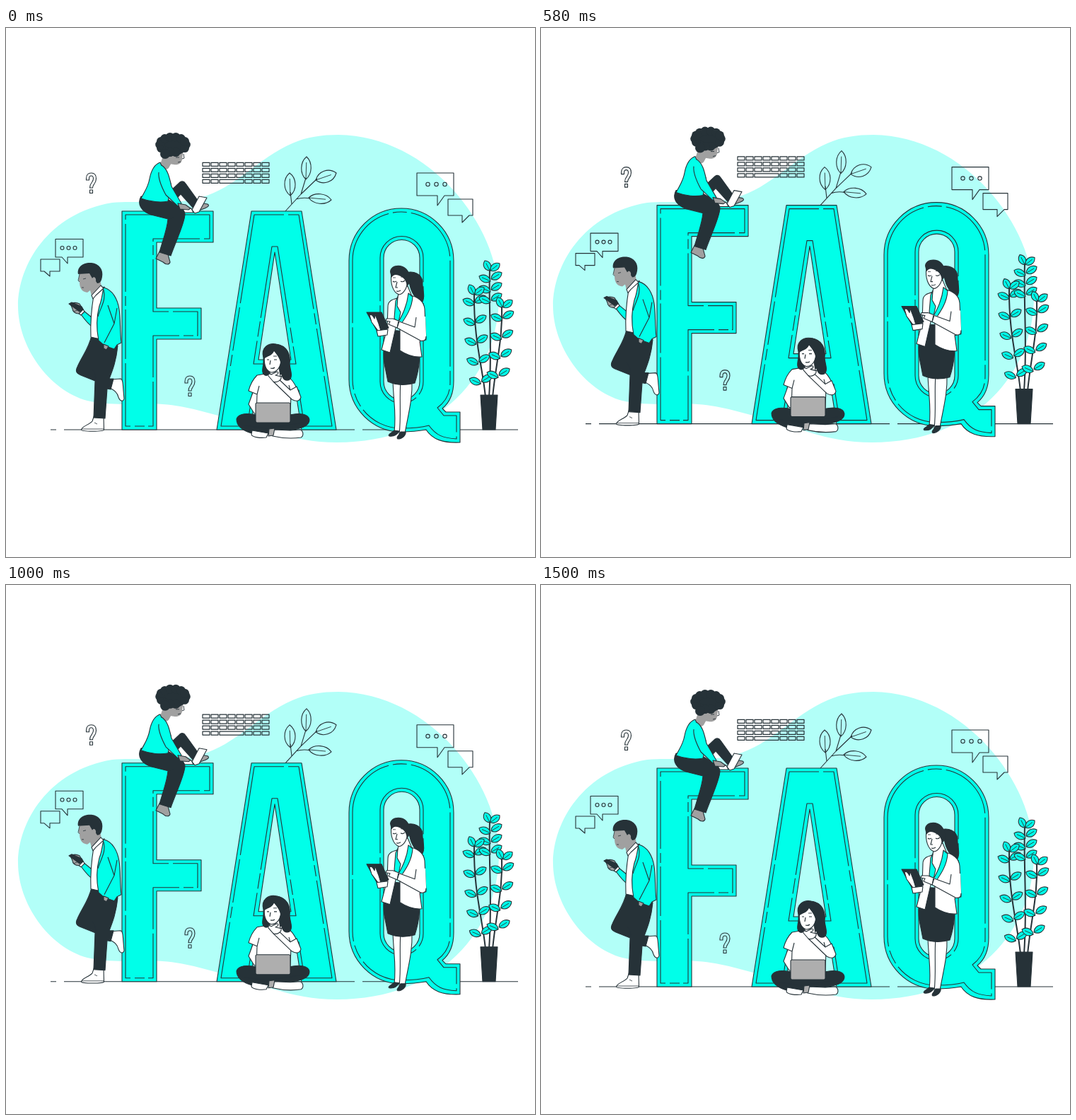
Write an HTML page with a canvas that moves like this. It is 748 by 748 pixels and loops after 1540 ms.

```html
<!DOCTYPE html>
<html lang="en">
<head>
<meta charset="utf-8">
<title>FAQ</title>
<style>
html, body { margin: 0; width: 100%; height: 100%; overflow: hidden; background: #fff; }
canvas { display: block; width: 748px; height: 748px; }
</style>
</head>
<body>
<canvas id="stage" width="748" height="748"></canvas>
<script>
const ctx = document.getElementById('stage').getContext('2d');
const INK = '#263238', CYAN = '#00ffe9', PALE = '#b2fff8', WHITE = '#fff', SKIN = '#a0a0a0', GREY = '#aeaeae';
const LOOP = 1540, STEP = 1500 / 36, LIFT = 10.8;

function shape(d, fill, width = 1.1) {
  const path = new Path2D(d);
  if (fill) { ctx.fillStyle = fill; ctx.fill(path, 'evenodd'); }
  if (width) { ctx.lineWidth = width; ctx.stroke(path); }
}
const line = (d, width) => shape(d, null, width);

function dashed(d, pattern, offset = 0) {
  ctx.setLineDash(pattern);
  ctx.lineDashOffset = offset;
  line(d, 1.1);
  ctx.setLineDash([]);
}

function dot(x, y, r, fill, width = 1.1) {
  ctx.beginPath();
  ctx.arc(x, y, r, 0, 7);
  if (fill) { ctx.fillStyle = fill; ctx.fill(); }
  if (width) { ctx.lineWidth = width; ctx.stroke(); }
}

// Pointed oval from base to tip, with a midrib.
function leaf(x, y, tx, ty, wide, fill) {
  const mx = (x + tx) / 2, my = (y + ty) / 2, len = Math.hypot(tx - x, ty - y);
  const nx = -(ty - y) / len * wide, ny = (tx - x) / len * wide;
  const ux = (tx - x) * .25, uy = (ty - y) * .25;
  shape(`M${x} ${y}C${mx + nx - ux} ${my + ny - uy} ${mx + nx + ux} ${my + ny + uy} ${tx} ${ty}` +
    `C${mx - nx + ux} ${my - ny + uy} ${mx - nx - ux} ${my - ny - uy} ${x} ${y}Z`, fill);
  line(`M${x} ${y}L${x + (tx - x) * .75} ${y + (ty - y) * .75}`, .9);
}

function blob() {
  shape('M17 393C17 335 60 262 150 247C190 243 230 252 275 240C325 226 355 185 405 163C425 154 447 151 470 151' +
    'C600 153 697 280 697 380C697 488 614 586 468 586C400 586 360 562 300 548C270 540 240 531 200 531' +
    'C170 532 140 533 115 527C60 512 17 450 17 393Z', PALE, 0);
}

function question(x, y) {
  ctx.save();
  ctx.translate(x, y);
  line('M0 8C0 2.500 3 0 7 0C11 0 14 2.500 14 8C14 12 12.500 14 11 16C9.500 18 9 18.500 9 21H5C5 17 6 15.500 8 13' +
    'C9.500 11 10 10 10 8C10 5.500 9 4 7 4C5 4 4 5.500 4 8V10H0ZM5 24H9V28.500H5Z');
  ctx.restore();
}

function keyboard() {
  ctx.lineWidth = 1.2;
  for (let row = 0; row < 4; row++) {
    for (let col = 0; col < 8; col++) {
      const space = row === 3 && col === 2;
      ctx.strokeRect(278 + col * 12, 190.3 + row * 8, space ? 34 : 10, 5);
      if (space) col += 2;
    }
  }
}

function bubbles() {
  line('M70 298.5H109V324H87V333L79 324H70Z');
  line('M49 327H76V344H62V351L54 344H49Z');
  line('M581 205H633V237H620L610 251V237H581Z');
  line('M625 242H660V265H655L645 275V265H625Z');
  for (const i of [0, 1, 2]) {
    dot(79.5 + i * 9, 311, 2.5);
    dot(596.5 + i * 12, 221, 2.7);
  }
}

function branch() {
  line('M395 259L417 235L440 213M404 249L402 232M417 235L424 212M410 242Q420 239 430 241');
  leaf(402, 237, 401, 205, 10);
  leaf(424, 214, 425, 182, 9);
  leaf(438, 215, 467, 205, 11);
  leaf(428, 240, 460, 243, 9);
}

function letterF() {
  shape('M164 259H293V303H213V396H276V440H213V568H164Z', CYAN);
  dashed('M169 264H288V298H208V401H271V435H208V563H169Z', [70, 5, 14, 6, 96, 6], 30);
}

function letterA() {
  shape('M347 259H418L467 568H418L410 517H353L345 568H298ZM380 317L357 469H403Z', CYAN);
  dashed('M351 264H414L461 563H422L414 512H349L341 563H304Z', [62, 6, 150, 6, 16, 6], 20);
  dashed('M376 309H384L410 475H350Z', [118, 6, 22, 5]);
}

function letterQ() {
  shape('M485 329A74 74 0 0 1 633 329V499C633 516 628 529 617 538L622 543H642V586C618 587 603 582 594 568' +
    'C583 570 572 571 559 571A74 74 0 0 1 485 497ZM534 325A25.500 25.500 0 0 1 585 325V500A25.500 25.500 0 0 1 534 500Z', CYAN);
  dashed('M490 329A69 69 0 0 1 628 329V500C628 518 622 528 610 537L619 548H637V581C618 580 608 576 598 562' +
    'C587 565 572 566 559 566A69 69 0 0 1 490 497Z', [150, 6, 20, 6, 88, 6], 60);
  dashed('M529 325A30.500 30.500 0 0 1 590 325V500A30.500 30.500 0 0 1 529 500Z', [130, 6, 18, 6]);
}

function plant() {
  line('M678 522C674 480 661 440 662 376M683 522C688 450 682 400 684 342M688 522C693 470 703 440 701 388', 2);
  const stems = [
    { x: y => 662 + ((y - 376) / 146) ** 2 * 13, from: 388, to: 505, gap: 28 },
    { x: () => 685, from: 355, to: 395, gap: 15 },
    { x: y => 702 - ((y - 388) / 134) ** 2 * 10, from: 410, to: 510, gap: 27 }
  ];
  for (const { x, from, to, gap } of stems) {
    for (let y = from; y < to; y += gap) {
      const cx = x(y);
      leaf(cx, y + 3, cx - 16, y - 4, 6.5, CYAN);
      leaf(cx + 1, y, cx + 16, y - 9, 6.5, CYAN);
    }
  }
  const tip = (x, y) => {
    leaf(x, y, x - 7, y - 14, 6.5, CYAN);
    leaf(x + 1, y, x + 14, y - 10, 6.5, CYAN);
  };
  tip(662, 377);
  tip(684, 343);
  tip(702, 395);
  shape('M671 519H695L692 568H674Z', INK);
}

function man() {
  // legs and shoes
  shape('M148 497L162 496C166 497 165 505 167 524C166 529 161 528 159 522C157 514 152 512 147 509Z', WHITE);
  shape('M125 547L138 548L138.5 568C138 571 107 571 106.5 568C107 563 118 561 122 556Z', WHITE);
  line('M107 567H138M125 558L129 560', .8);
  shape('M121 435L158 449C156 470 151 483 146 496L152 496L148 511L143 510L140 552L124 551L126 499' +
    'L106 491C99 488 98 485 101 479C107 465 117 453 121 435Z', INK);
  line('M126 499C128 492 125 486 121 482', .7);
  // shirt and far sleeve
  shape('M126 405L124 424C116 419 111 412 106 405L110 400L121 409Z', CYAN);
  shape('M127 372L139 366C141 390 140 420 138 441L120 437C119 415 122 390 124 378Z', WHITE);
  shape('M103 395L108 396L111 401L106 406L102 403Z', WHITE);
  shape('M91 390C95 388 100 388 104 390L109 398L103 404C98 404 94 401 94 397Z', SKIN);
  shape('M89 390L93 388L107 394L109 398L104 401Z', INK);
  line('M96 401L103 398', .8);
  // head
  shape('M104 345C104 352 101 357 104 359C104 366 106 373 115 374L119 371L121 379L135 366L132 350L120 338Z', SKIN, 0);
  line('M104 348L102 357L104 359M109 355L113 354M107 367L110 367', .8);
  shape('M102 348C100 339 108 331 121 332C132 333 138 342 136 352C135 358 133 361 129 361L127 358' +
    'C128 353 124 350 122 354L118 347Z', INK, 0);
  shape('M121 378L134 364L138 368L127 378L123 383Z', WHITE);
  // jacket
  shape('M138 367C151 370 158 384 160 398C162 410 161 430 163 445L157 448L153 454L139 449L131 442' +
    'C127 422 128 408 132 393C136 383 136 375 138 367Z', CYAN);
  line('M138 370C142 385 134 394 130 408M144 392L153 418L139 445M153 418L157 396');
  shape('M138 447L145 450L142 455L138 453Z', SKIN);
}

function reader() {
  // raised leg and laptop
  shape('M230 233L246 218C249 216 252 217 254 220L272 245L265 255L247 235L237 246Z', INK);
  shape('M270 252L274 247L285 249C288 251 286 253 281 255L270 259Z', SKIN);
  shape('M228 246L262 255L265 261H241Z', WHITE);
  shape('M263 257L273 238L284 240L273 260L267 262Z', WHITE);
  // lower leg
  shape('M217 316L229 320L232 331C231 335 226 335 222 331L212 326Z', SKIN);
  shape('M191 238L230 243C241 250 252 254 253 263C253 275 240 302 233 322L217 317C222 299 228 284 229 270' +
    'L205 264C191 259 185 249 191 238Z', INK);
  line('M229 270L237 268', .7);
  // torso, neck and arm
  shape('M222 181L236 187L230 198C226 202 219 200 217 196Z', SKIN, 0);
  shape('M218 190C209 193 205 203 203 213C201 225 196 231 191 241C204 246 219 247 229 245C231 237 232 228 233 220' +
    'L226 202C222 199 220 196 218 190Z', CYAN);
  shape('M220 194C229 200 231 211 234 224L248 248L243 252L226 236C219 223 215 212 216 204', CYAN);
  shape('M243 248L254 250L261 255L258 257L246 256Z', SKIN);
  // head
  shape('M226 175L251 172L249 186C248 192 243 194 237 193L231 192L226 184Z', SKIN, 0);
  line('M251 178L252 184L249 185M240 183H245M243 190L247 189', .9);
  ctx.fillStyle = INK;
  ctx.beginPath();
  ctx.ellipse(235, 166, 21, 15, 0, 0, 7);
  ctx.fill();
  for (let i = 0; i < 14; i++) {
    const a = i / 14 * Math.PI * 2;
    if (i !== 2) dot(236 + 18.5 * Math.cos(a), 165 + 11 * Math.sin(a), 6.3, INK, 0);
  }
  dot(225, 178, 7, INK, 0);
}

function thinker() {
  // back hair, shirt and bare arms
  shape('M364 466C360 452 371 445 382 447C397 449 403 461 401 475C402 485 406 491 401 498C391 503 369 493 365 485Z', INK);
  shape('M351 510L343 532L351 545H360V514Z', WHITE);
  shape('M372 488L355 491C348 498 345 505 343 513L355 518L354 548H402L403 516L411 509C406 499 402 494 393 490Z', WHITE);
  line('M355 518L358 506M403 516L400 505M372 490Q380 500 392 491');
  shape('M411 507L417 522C415 529 409 528 404 525L378 500L384 495L402 512Z', WHITE);
  // crossed legs and feet
  shape('M326 553C329 544 342 545 354 547H401C414 544 428 545 429 554C429 563 417 567 397 569L376 574' +
    'L347 573C334 569 326 562 326 553Z', INK);
  line('M336 562L370 566M378 565L420 558', .7);
  shape('M348 569L371 573L368 579C360 580 349 579 347 575Z', WHITE);
  shape('M379 568L402 569L416 568C421 570 421 577 417 579C404 581 390 580 377 577Z', WHITE);
  shape('M372 567L380 566L378 576L371 577Z', GREY);
  shape('M355 530H400Q402 530 402 532V556Q402 558 400 558H355Q353 558 353 556V532Q353 530 355 530Z', GREY);
  // face and front hair
  shape('M373 482L386 479L388 493C382 498 376 496 373 490Z', WHITE);
  shape('M366 461C364 473 366 484 375 487C384 487 389 479 389 466L383 455Z', WHITE);
  line('M369 469H372M379 469H383M374 470L373 476M374 481Q378 482 380 480', 1.2);
  line('M368 464L372 463M378 464L383 464', .9);
  shape('M364 467C364 454 373 446 384 447C397 450 402 461 401 475C402 488 406 492 401 498C393 501 389 494 389 486' +
    'C390 472 386 465 379 457C376 464 369 464 366 467Z', INK, 0);
  shape('M364 464C365 476 366 481 371 487C373 491 368 494 364 490C360 484 364 480 364 464Z', INK, 0);
  shape('M371 492C370 489 373 488 375 490L383 486C387 487 384 490 381 491L389 493C390 498 383 502 378 500Z', WHITE);
}

function presenter() {
  // legs and shoes
  shape('M547 498C548 530 552 545 549 571H557L563 530V498Z', WHITE);
  shape('M558 498H574C575 525 569 545 564 573L556 574C559 550 556 525 558 498Z', WHITE);
  shape('M549 569L556 570C553 575 549 578 542 577C539 575 545 573 549 569Z', INK);
  shape('M558 571L565 571C566 575 561 581 554 581C551 579 556 576 558 571Z', INK);
  shape('M541 427C534 445 532 462 536 480L540 500C553 506 568 505 578 502C585 481 587 460 582 430Z', INK);
  // ponytail, neck and top
  shape('M565 346C576 343 588 347 589 359C588 369 594 379 588 389C580 383 572 375 570 358Z', INK);
  shape('M557 368L568 365L575 382L557 416L550 406L553 384Z', WHITE);
  // jacket
  shape('M553 382C546 384 540 386 540 394L539 424L531 455L543 459L551 424Z', WHITE);
  shape('M571 378C583 380 591 387 592 397L594 441L585 443L588 465C577 466 566 462 557 456L557 420Z', WHITE);
  shape('M554 380L551 386L549 410L554 420L558 402L553 393Z', CYAN);
  shape('M569 375L575 380C574 396 566 408 557 421L553 419C561 405 567 393 569 375Z', CYAN);
  shape('M580 409L578 422L555 414L553 423L586 442C592 444 594 441 594 434L593 408Z', WHITE, 0);
  line('M580 409L578 423L556 415L553 424L586 442Q594 444 594 436');
  // head
  shape('M545 347C543 361 547 374 556 377C564 375 569 364 568 352L561 343Z', WHITE);
  line('M547 358Q549 360 552 358M558 358Q561 360 564 357M553 359L551 367L554 367M552 372Q555 373 558 371', 1.1);
  line('M547 353H551M558 352L563 352', .8);
  shape('M543 345C543 337 553 334 561 337C569 340 573 350 571 360L567 366C566 359 565 355 558 351C552 348 548 348 545 353Z', INK, 0);
  // tablet and hands
  shape('M510 402H531L541 424L526 431Z', INK);
  shape('M514 406C517 404 519 407 521 411L522 405L527 418L530 428H526L517 416Z', WHITE);
  shape('M524 428L540 426L539 434L526 436Z', WHITE);
  shape('M555 414L547 411L538 411L537 414L543 415L541 419L553 424Z', WHITE);
}

function draw() {
  const t = (performance.now() - start) % LOOP;
  const phase = Math.min(36, Math.floor((t + 5) / STEP)) / 18;
  ctx.clearRect(0, 0, 748, 748);
  ctx.strokeStyle = INK;
  ctx.lineJoin = 'round';
  blob();
  ctx.save();
  ctx.translate(0, -LIFT * (1 - Math.abs(1 - phase)));
  line('M63 568H71M82 568H493M504 568H724');
  keyboard();
  bubbles();
  branch();
  question(113.5, 205);
  question(253, 492);
  letterF();
  letterA();
  letterQ();
  plant();
  man();
  reader();
  thinker();
  presenter();
  ctx.restore();
  requestAnimationFrame(draw);
}

const start = performance.now();
draw();
</script>
</body>
</html>
```
